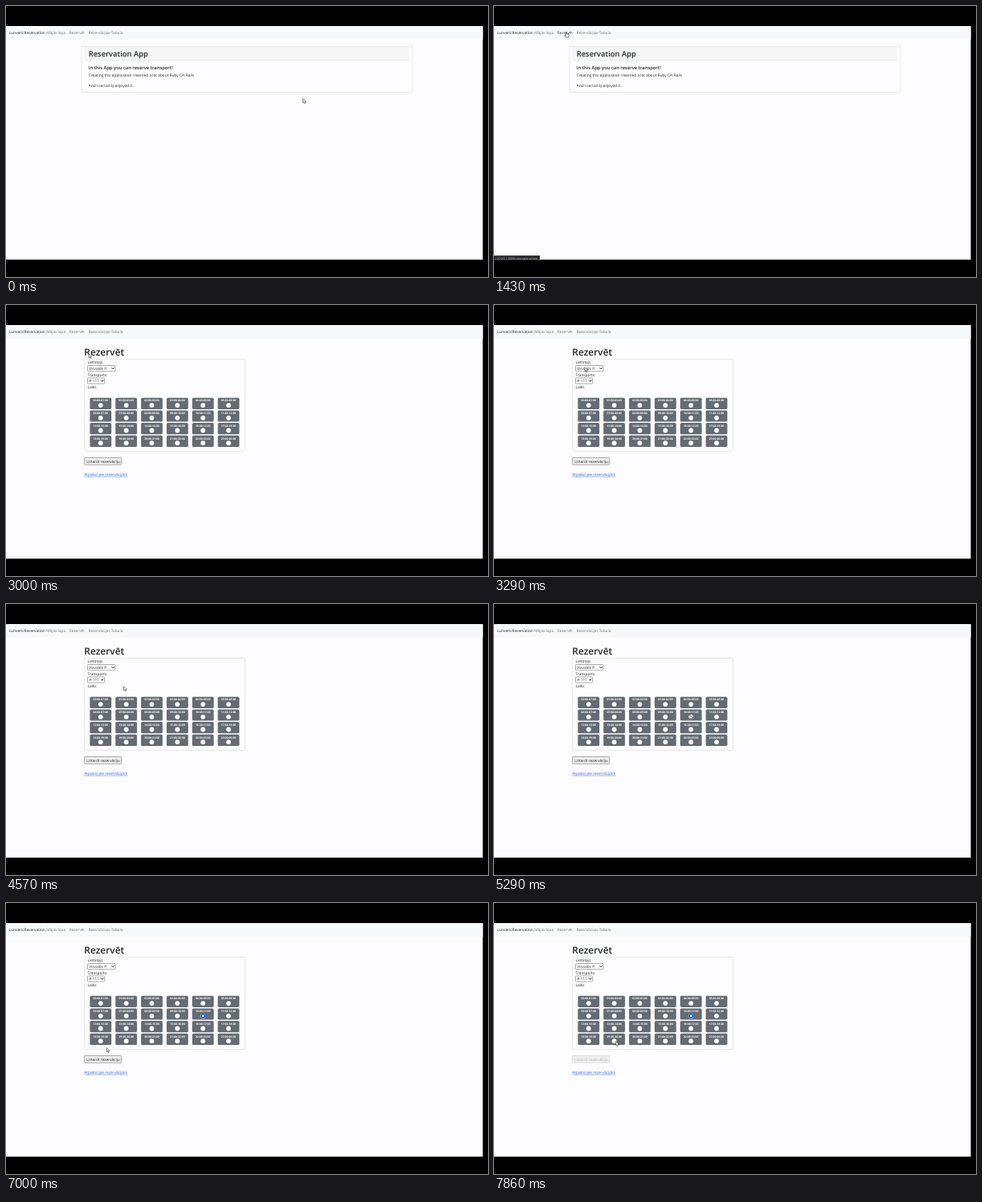
An HTML page that plays this animation: 600 by 338 pixels, repeating every 8000 ms.

```html
<!DOCTYPE html>
<html lang="lv">
<head>
<meta charset="utf-8">
<title>Reservation App</title>
<style>
html, body { margin: 0; width: 100%; height: 100%; overflow: hidden; background: #000; }
svg { display: block; width: 600px; height: 338px; }
text { font: 4.78px "Open Sans", "Noto Sans", sans-serif; fill: #212529; text-rendering: geometricPrecision; white-space: pre; }
.semi { font-weight: 600; }
.mid { text-anchor: middle; }
</style>
</head>
<body>
<svg id="stage" viewBox="0 0 600 338"></svg>
<script>
const FPS = 7, FRAMES = 56, PAGE = '#fdfcfe';

const rect = (x, y, w, h, fill, more = '') =>
  `<rect x="${x}" y="${y}" width="${w}" height="${h}" fill="${fill}" ${more}/>`;
const text = (x, y, str, style = '', cls = '') =>
  `<text x="${x}" y="${y}" style="${style}" class="${cls}">${str}</text>`;
const size = (px, fill = '#212529') => `font-size:${px}px;fill:${fill}`;
const line = (color, r = 0, w = 0.6) => `stroke="${color}" stroke-width="${w}" rx="${r}"`;
const group = (id, body) => `<g id="${id}">${body}</g>`;

const select = (y, w, label) =>
  rect(101.5, y, w, 7.2, '#fff', line('#767676', 0.8)) +
  text(103.3, y + 5.4, label) +
  `<path d="M${w + 97.2} ${y + 2.8}l1.5 1.6 1.5-1.6" fill="none" stroke="#111" stroke-width="1"/>`;

const hour = n => String(n % 24).padStart(2, '0') + ':00';

function slot(n) {
  const x = 117.8 + 31.85 * (n % 6), y = 115.7 + 15.7 * Math.floor(n / 6);
  return rect(x - 13.4, y, 26.8, 14.2, '#646b72', 'rx="1.6"') +
    text(x, y + 4.7, `${hour(n)}-${hour(n + 1)}`, size(3.4, '#fff') + ';font-weight:700', 'mid') +
    `<circle cx="${x}" cy="${y + 9.4}" r="2.9" fill="#fff"/>` +
    (n === 10 ? `<g id="picked"><circle cx="${x}" cy="${y + 9.4}" r="2.7" fill="#0d5ff0"/>
      <circle cx="${x}" cy="${y + 9.4}" r="1.2" fill="#fff"/></g>` : '');
}

const nav = rect(0, 25, 593.5, 291.4, PAGE) + rect(0, 25, 593.5, 17, '#f6f9f9') +
  text(3.7, 35.3, 'LunvericReservation') +
  text(50.3, 35.3, 'Mājās lapa', 'fill:#777') +
  `<g id="navLink">${text(78.8, 35.3, 'Rezervēt', 'fill:inherit')}</g>` +
  text(102.5, 35.3, 'Rezervācijas Tabula', 'fill:#777');

const home = rect(94, 50.3, 412, 57.2, PAGE, line('#dcdcdc', 1.3)) +
  rect(98, 51, 404, 16.5, '#f6f6f6') + rect(98, 67.2, 404, 0.5, '#ddd') +
  text(102.7, 62.5, 'Reservation App', size(9.4), 'semi') +
  text(102.7, 78.5, 'In this App you can reserve transport!', size(5.8), 'semi') +
  text(102.7, 88.1, 'Creating this application I learned a lot about Ruby On Rails') +
  text(102.7, 100.6, 'And I certainly enjoyed it.');

const form = text(97.3, 62.6, 'Rezervēt', size(11.9), 'semi') +
  rect(97.5, 67.5, 200, 115, PAGE, line('#dcdcdc', 0.8)) +
  text(101.5, 73.4, 'Lietotajs') + select(75.5, 34.5, 'Visvalds P.') +
  text(101.5, 88.8, 'Transports') + select(90.9, 21, 'A-111') +
  text(101.5, 104.1, 'Laiks') +
  Array.from({ length: 24 }, (_, n) => slot(n)).join('') +
  group('ready', rect(97.5, 190.5, 46, 8.8, '#efefef', line('#767676', 0.8)) +
    text(100.2, 196.8, 'Uztaisīt rezervāciju')) +
  group('sent', rect(97.5, 190.5, 46, 8.8, '#efefef', line('#d0d0d0', 0.8)) +
    text(100.2, 196.8, 'Uztaisīt rezervāciju', 'fill:#b5b5b5')) +
  text(97.3, 212.8, 'Atpakaļ pie rezervācijām', 'fill:#2f66e0;text-decoration:underline');

const status = rect(0, 311.3, 57, 5.1, '#202124', 'id="bar"') +
  text(1.8, 315.6, '127.0.0.1:3000/reservations/new', size(3.45, '#ddd'));

const arrow = '<path d="M0 0V5.2L1.3 4.1 2.1 6 3 5.6 2.2 3.8H3.8Z" fill="#fff" stroke="#111" stroke-width=".5"/>';
const hand = '<path d="M-.5 .5Q0-.2 .5 .5V2.4L3 3V5L2.4 6.8H-.6L-2.2 4.2-1.6 3.8-.5 4.6Z" fill="#fff" stroke="#111" stroke-width=".55"/>';

document.getElementById('stage').innerHTML = nav + group('home', home) + group('form', form) +
  group('status', status) + group('cursor', group('arrow', arrow) + group('hand', hand));

const el = id => document.getElementById(id);
const show = (id, on) => { el(id).style.display = on ? '' : 'none'; };

// Pointer stops: frame, x, y
const path = [
  [0, 369.6, 115.6], [1, 352, 110], [4, 190, 66], [6, 100, 36], [7, 90, 32.3],
  [18, 90, 32.3], [20, 98, 52], [23, 113, 77.6], [25, 113, 77.6],
  [27, 124, 129], [29, 110, 91], [31, 110, 91], [35, 256, 138], [37, 243.9, 138.2],
  [39, 245, 138], [42, 111, 75], [44, 112, 92], [47, 247, 137], [49, 125.3, 180.6],
  [51, 121, 198], [53, 121, 198], [55, 151.6, 172.6]
];

function pointer(f) {
  const i = Math.max(1, path.findIndex(p => p[0] >= f));
  const [f0, x0, y0] = path[i - 1], [f1, x1, y1] = path[i];
  const k = (f - f0) / (f1 - f0);
  return [x0 + (x1 - x0) * k, y0 + (y1 - y0) * k];
}

function draw(now) {
  const f = Math.floor((now + 4) * FPS / 1000) % FRAMES;
  const onLink = f >= 7 && f < 19;
  show('home', f < 16);
  show('form', f >= 16);
  show('status', f >= 9 && f < 21);
  el('status').style.opacity = f === 9 ? 0.5 : 1;
  el('bar').setAttribute('width', f < 16 ? 57 : f === 16 ? 199 : 286);
  el('navLink').style.fill = onLink ? '#444' : '#777';
  show('picked', f >= 38);
  show('ready', f < 53);
  show('sent', f >= 53);
  show('hand', onLink);
  show('arrow', !onLink);
  el('cursor').setAttribute('transform', `translate(${pointer(f)})`);
  requestAnimationFrame(draw);
}
requestAnimationFrame(draw);
</script>
</body>
</html>
```
